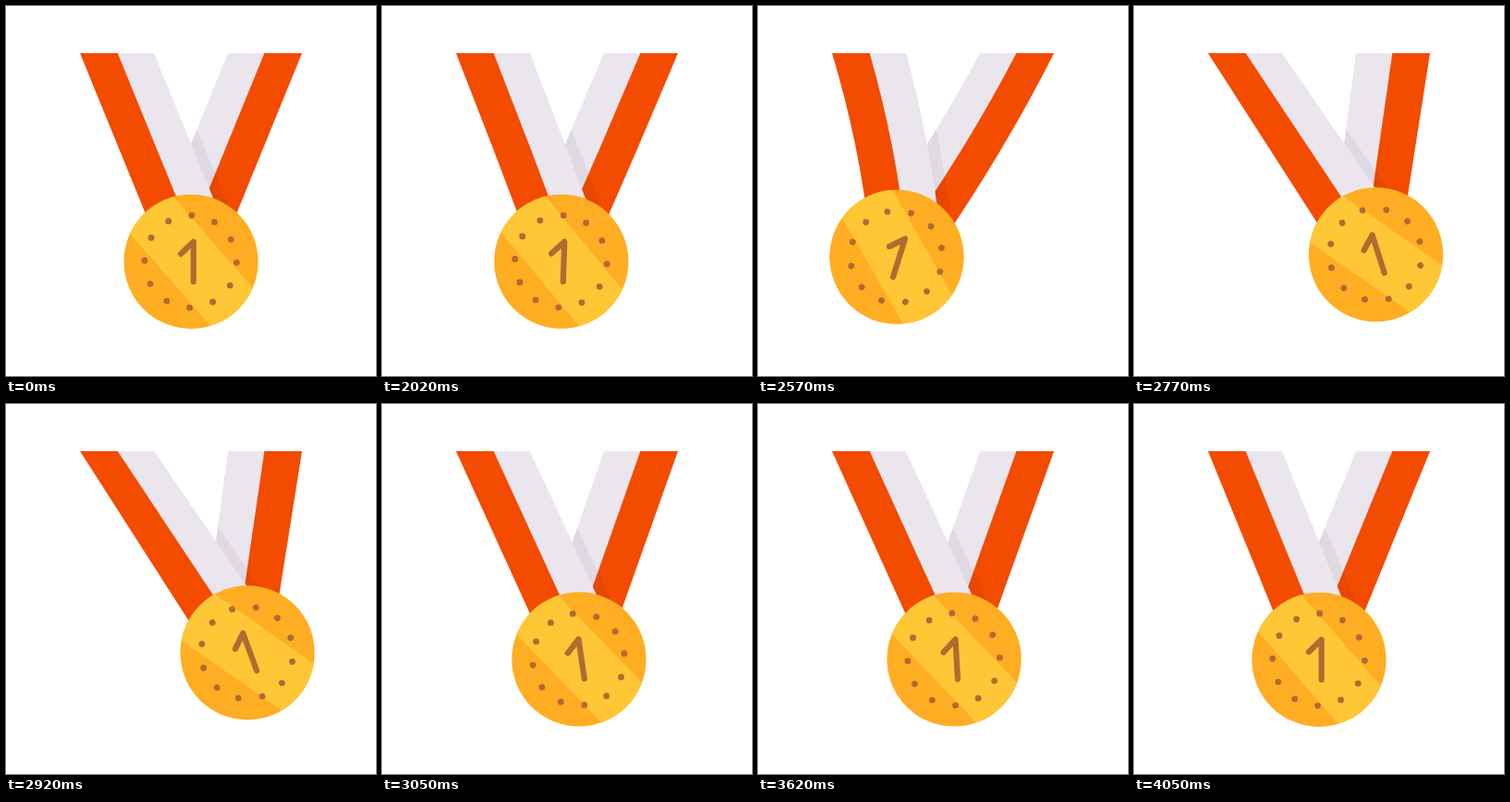
These frames come from a looping animation (400x400 px, 4100 ms). An HTML page with a canvas:

```html
<!DOCTYPE html>
<html lang="en">
<head>
<meta charset="utf-8">
<title>Swinging medal</title>
<style>
  html, body { margin: 0; width: 100%; height: 100%; overflow: hidden; background: #fff; }
  canvas { display: block; }
</style>
</head>
<body>
<canvas id="stage" width="400" height="400"></canvas>
<script>
const ctx = document.getElementById('stage').getContext('2d');
const LOOP = 4100, START = 2020, RAD = Math.PI / 180;
const PIVOT_Y = 22.3, ARM = 254, MEDAL_R = 72.6;
const TOP = 51, BOTTOM = 260, LEAN = 85.3;
const RED = '#f34b00', WHITE = '#ebe6ed', GOLD = '#ffad22', SHINE = '#ffc636', BROWN = '#b26a33';

// [time, degrees] at each turning point
const SWING = [[1993, 0], [2489, 15.65], [2834, -16.6], [3239, 8], [3645, -2.8], [4050, 0]];
const FACE = [[1993, 0], [2500, 22], [2845, -22.5], [3270, 7], [3660, -3.6], [4050, 0]];

// A sudden push at first, then eased swings that die down.
function angleAt(keys, t) {
  const i = keys.findIndex(key => key[0] > t);
  if (t < START || i < 1) return 0;
  const [t0, a] = keys[i - 1], [t1, b] = keys[i];
  const p = (t - t0) / (t1 - t0);
  const eased = i === 1 ? Math.sin(p * Math.PI / 2) : (1 - Math.cos(p * Math.PI)) / 2;
  return a + (b - a) * eased;
}

// One long ribbon edge; side is -1 for left, 1 for right, offset is measured from the middle.
// The ribbon on the far side turns less, and both bend while the medal is on the left.
function edge(side, offset, swing) {
  const x0 = 200 + side * offset;
  const angle = swing * RAD * (swing * side < 0 ? 0.97 : 0.86);
  const dx = side * (offset - LEAN), dy = BOTTOM - PIVOT_Y;
  const x1 = 200 + dx * Math.cos(angle) - dy * Math.sin(angle);
  const y1 = PIVOT_Y + dy * Math.cos(angle) + dx * Math.sin(angle);
  const bend = Math.max(swing, 0) * 0.85;
  return { x0, x1, y1, cx: (x0 + x1) / 2 + bend, cy: (TOP + y1) / 2 };
}

function strip(side, outer, inner, swing) {
  const a = edge(side, outer, swing), b = edge(side, inner, swing);
  const path = new Path2D();
  path.moveTo(a.x0, TOP);
  path.quadraticCurveTo(a.cx, a.cy, a.x1, a.y1);
  path.lineTo(b.x1, b.y1);
  path.quadraticCurveTo(b.cx, b.cy, b.x0, TOP);
  path.closePath();
  return path;
}

function fill(path, color) {
  ctx.fillStyle = color;
  ctx.fill(path);
}

function ribbon(side, swing) {
  fill(strip(side, 80, 40, swing), WHITE);
  fill(strip(side, 120, 79.3, swing), RED);
}

function shadow(swing) {
  ctx.save();
  ctx.clip(strip(1, 120, 40, swing));
  ctx.translate(13, 0);
  fill(strip(-1, 120, 40, swing), 'rgba(0, 0, 0, 0.05)');
  ctx.restore();
}

function disc(x, y, r, color) {
  const path = new Path2D();
  path.arc(x, y, r, 0, 2 * Math.PI);
  fill(path, color);
  return path;
}

function medal(swing, face) {
  const a = swing * RAD;
  ctx.save();
  ctx.translate(200 - ARM * Math.sin(a), PIVOT_Y + ARM * Math.cos(a));
  const body = disc(0, 0, MEDAL_R, GOLD);

  ctx.save();
  ctx.clip(body);
  ctx.rotate((49 + swing) * RAD);
  ctx.fillStyle = SHINE;
  ctx.fillRect(-80, -31.7, 160, 61.7);
  ctx.restore();

  ctx.rotate(face * RAD);
  for (let i = 0; i < 12; i++) {
    const d = (i * 30 + 1.2) * RAD;
    disc(49.8 * Math.sin(d) - 0.4, -49.8 * Math.cos(d), 3.4, BROWN);
  }
  ctx.strokeStyle = BROWN;
  ctx.lineWidth = 6.2;
  ctx.lineCap = ctx.lineJoin = 'round';
  ctx.beginPath();
  ctx.moveTo(-11, -8.3);
  ctx.lineTo(2.7, -21.5);
  ctx.lineTo(2.7, 21.7);
  ctx.stroke();
  ctx.restore();
}

function draw() {
  const t = performance.now() % LOOP;
  const swing = angleAt(SWING, t);
  ctx.fillStyle = '#fff';
  ctx.fillRect(0, 0, 400, 400);
  ribbon(1, swing);
  shadow(swing);
  ribbon(-1, swing);
  medal(swing, angleAt(FACE, t));
  requestAnimationFrame(draw);
}
draw();
</script>
</body>
</html>
```
